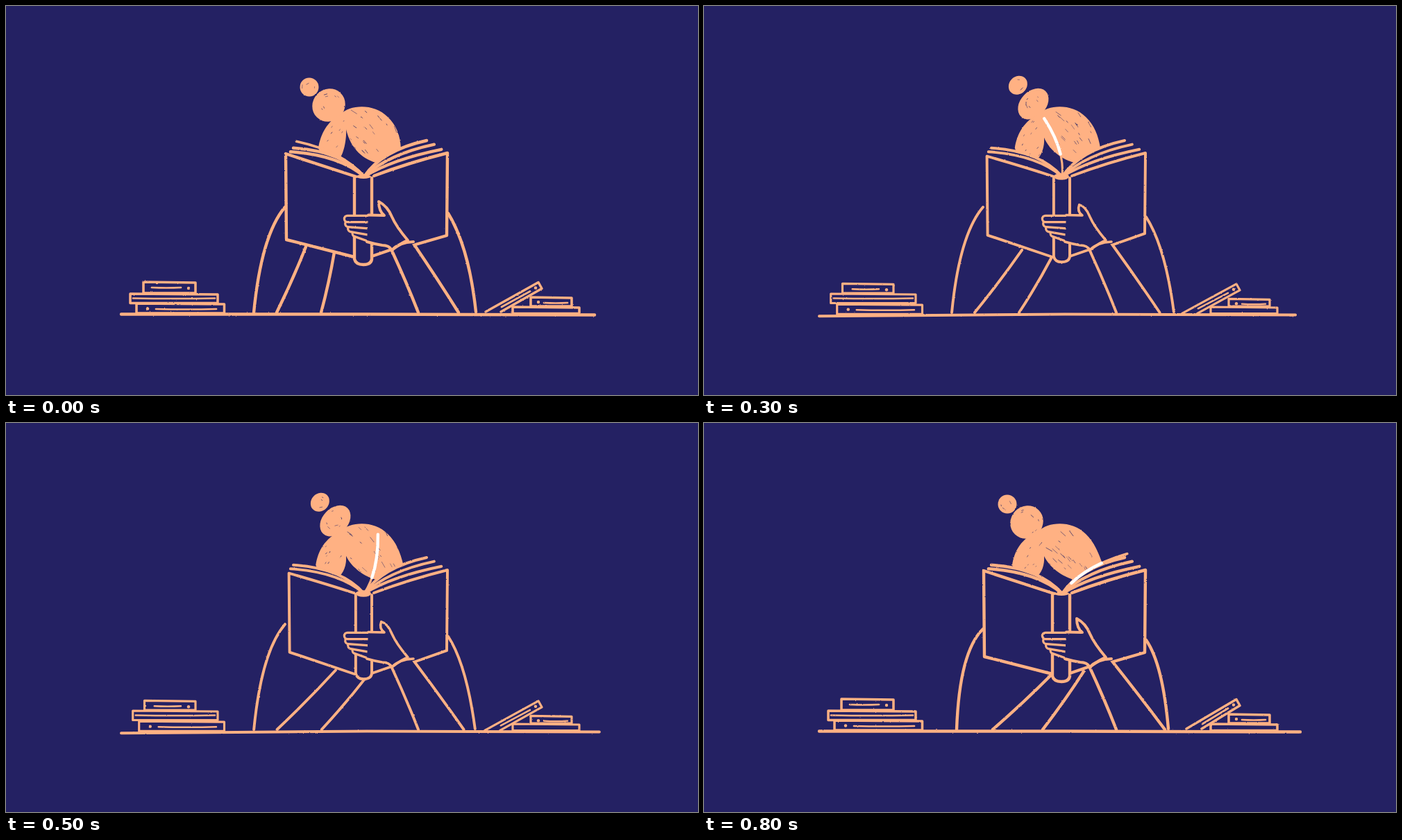
An HTML page for the animation above (1 s loop, 997 by 561 pixels).

```html
<!DOCTYPE html>
<html lang="en">
<head>
<meta charset="utf-8">
<title>Reader</title>
<style>
  html, body { margin: 0; width: 100%; height: 100%; overflow: hidden; background: #242163; }
  svg { display: block; width: 997px; height: 561px; }
  .pose { visibility: hidden; animation: show 1s step-end infinite; }
  .pose:last-child { animation-name: hold; }
  @keyframes show { 0% { visibility: visible; } 10% { visibility: hidden; } }
  @keyframes hold { 0% { visibility: visible; } 20% { visibility: hidden; } }
</style>
</head>
<body>
<svg id="stage" viewBox="0 0 997 561" fill="none" stroke-linecap="round" stroke-linejoin="round"></svg>
<script>
const BG = '#242163', INK = '#ffb183', WHITE = '#fff';
const POSES = 9;
const HUB = [516, 246]; // fold of the book

const lerp = (a, b, t) => a + (b - a) * t;

function random(seed) {
  return () => (seed = (seed * 16807) % 2147483647) / 2147483647;
}

// A page standing at an angle from upright, bowed sideways
function leaf(degrees, length, bow) {
  const a = degrees * Math.PI / 180, sin = Math.sin(a), cos = Math.cos(a);
  const tip = [HUB[0] + sin * length, HUB[1] - cos * length];
  const bend = [HUB[0] + sin * length * .4 + cos * bow * 2, HUB[1] - cos * length * .4 + sin * bow * 2];
  return { tip, bend, d: `M${HUB}Q${bend} ${tip}` };
}

function drawPose(i) {
  const t = i / (POSES - 1);
  const sway = Math.sin(Math.PI * t); // out and back over the loop
  const late = t ** 8;                // shift that comes at the very end
  const rnd = random(977 + i * 5413);
  const pen = 4.4 - .5 * sway, thin = pen * .8, fine = pen * .62;
  let out = '';

  const stroke = (d, w = pen, color = INK, extra = '') => {
    out += `<path d="${d}" stroke="${color}" stroke-width="${w}" ${extra}/>`;
  };
  const fill = (d, color = BG) => { out += `<path d="${d}" fill="${color}"/>`; };
  const dot = (x, y) => { out += `<circle cx="${x}" cy="${y}" r="2.2" fill="${INK}"/>`; };
  const box = (x, y, x2, y2) => stroke(`M${x} ${y}L${x2} ${y + 1}V${y2}H${x}Z`, thin);
  const label = (x, x2, y) => stroke(`M${x} ${y}Q${(x + x2) / 2} ${y + 1} ${x2} ${y}`, fine);

  function fleck(x, y, angle, len) {
    const dx = Math.cos(angle) * len / 2, dy = Math.sin(angle) * len / 2;
    stroke(`M${x - dx} ${y - dy}L${x + dx} ${y + dy}`, .5 + rnd() * .5, BG, 'opacity=".75"');
  }

  function ball(x, y, rx, ry, flecks) {
    out += `<ellipse cx="${x}" cy="${y}" rx="${rx}" ry="${ry}" transform="rotate(-46 ${x} ${y})" fill="${INK}"/>`;
    for (let k = 0; k < flecks; k++) {
      const a = rnd() * 6.28, r = ry * (.3 + rnd() * .5);
      fleck(x + Math.cos(a) * r, y + Math.sin(a) * r, a + 1.57, 1 + rnd() * 4);
    }
  }

  function drawHair() {
    const lean = sway ** 2;
    ball(437 + 18 * lean, 117 - 3 * sway, 13.5 + sway, 13.5 - sway, 3);
    ball(465 + 11 * lean, 143 - 2 * sway, 24.5 + sway, 23 - 5 * sway, 6);

    const left = 450 - 6 * t, right = 569 + 6 * t;
    const part = 192 - 14 * (1 - t) ** 4;
    const d = `M${left} 205C${left + 3} 185 ${left + 13} 166 482 156C496 142 530 140 550 160` +
      `C562 172 568 185 ${right} 206L537 227C515 222 497 207 490 ${part}` +
      `C491 ${part + 12} 487 217 477 224L${left + 8} 222Z`;
    fill(d, INK);
    out += `<clipPath id="hair${i}"><path d="${d}"/></clipPath><g clip-path="url(#hair${i})">`;
    for (let k = 0; k < 24; k++) {
      const x = 495 + rnd() * 72;
      fleck(x, 152 + rnd() * 62, .45 + (x - 495) / 110 + rnd() * .25, 2 + rnd() * 8);
    }
    for (let k = 0; k < 10; k++) fleck(452 + rnd() * 36, 165 + rnd() * 50, 2 + rnd() * .4, 1 + rnd() * 2);
    out += '</g>';
  }

  const bookBottom = x => 366 - .28 * Math.abs(x - 516);

  function drawArms() {
    stroke(`M402 ${290 + 7 * late}Q368 330 ${357 + 7 * late} 442`);
    stroke(`M637 ${lerp(299, 313, t)}Q${667 - 6 * t} 348 ${677 - 8 * t ** 4} 441`);

    const forearm = (x, y, foot) => stroke(`M${x} ${y}Q${(x + foot) / 2 + 2} ${(y + 442) / 2 + 1} ${foot} 442`);
    const inner = lerp(433, 500, t), outer = lerp(473, 547, t);
    forearm(inner, bookBottom(inner) + 2, 390 + 26 * late);
    forearm(outer, bookBottom(outer) + 1, 454 + 34 * late);
    forearm(556, 353, 594);
    forearm(586, 341, 652 + 12 * t);
  }

  function drawBook() {
    const x = 403 + 5 * sway, y = 213 + 4 * sway, low = 337 - 7 * sway;
    const left = [], right = [];
    for (let k = 0; k < 3; k++) {
      if (k < 2) left.push(leaf(-68 - 3.4 * k, 110 + 2 * k, 11 - 2 * k));
      right.push(leaf(60 + 5.3 * k, 104 + 7 * k, 2.5 * k - 10));
    }
    fill(`M${left[0].tip}Q${left[0].bend} ${HUB}Q${right[0].bend} ${right[0].tip}` +
      `L636 212V330L515 362L${x} ${low}V${y}Z`);
    for (const p of [...left, ...right]) stroke(p.d);

    // covers
    stroke(`M504 246Q458 231 ${x} ${y}L${x + 1} ${low}L502 362`);
    stroke(`M530 245Q580 226 636 212L635 ${331 - 3 * sway}L590 344`);
    stroke('M556 351L527 361');

    // spine
    const sx = 502 + 2 * sway, sy = 373 - 4 * sway;
    const back = `M${sx} 248V${sy - 8}Q${sx + 2} ${sy} 515 ${sy}Q526 ${sy} 527 ${sy - 8}V248`;
    fill(back);
    stroke(back);
    out += `<ellipse cx="515" cy="246" rx="11" ry="${3 + 2 * sway}" fill="${INK}"/>`;

    // turning page, lit above its foot
    const turn = leaf(lerp(-62.5, 58.5, t), 86 + 24 * (2 * t - 1) ** 2, 9 - 4 * t - 14 * t ** 12);
    const foot = lerp(.48, .18, t), lit = 1 - foot - .35 * t ** 16;
    stroke(turn.d, thin);
    if (t) stroke(turn.d, 4.4, WHITE, `pathLength="1" stroke-dasharray="${lit} 2" stroke-dashoffset="${-foot}"`);
  }

  function drawHand() {
    for (let k = 3; k >= 0; k--) {
      const finger = `M${492 + 1.3 * k * k} ${307 + 7 * k}L523 ${307 + 9.3 * k}`;
      stroke(finger, 12.5);
      stroke(finger, 6, BG);
    }
    const tx = 537 + 4 * sway, ty = 282 + 5 * sway;
    const thumb = `M522 301.5L545 302Q537 296 ${tx} ${ty}Q550 289 556 304Q562 318 579 338`;
    const palm = 'Q572 340 556 352Q552 345 542 345Q530 343 520 340';
    fill(thumb + palm);
    stroke(thumb + palm, pen * .9);
    stroke('M556 352Q566 341 587 340', pen * .9);
  }

  function drawStacks() {
    const dx = 4 * sway, dy = 2.5 * sway;
    box(198 + dx * .4, 398 + dy, 273, 414);
    label(210 + dx, 252, 406 + dy);
    dot(263, 407 + dy);
    box(179 + dx, 415, 305, 428.5);
    label(183 + dx, 301, 421.5);
    box(188 + dx, 429 + dy * .5, 314.5, 443 + dy * .6);
    dot(204 + dx, 436.5 + dy * .5);
    label(216 + dx, 303, 437 + dy * .5);

    const x = 691 - dx + 4 * t, y = 441 + dy, top = 398.5 + dy;
    stroke(`M${x} ${y}L767 ${top}L772 ${top + 9}L${x + 22} ${y}`, thin);
    stroke(`M${x + 23} ${y - 7}L755 ${top + 13}`, fine);
    dot(763, top + 8);
    box(756, 420 + dy, 815, 433);
    dot(767, 427 + dy);
    label(775, 809, 428 + dy * .7);
    box(730, 434, 826, 443.5);
  }

  drawHair();
  drawArms();
  drawBook();
  drawHand();
  drawStacks();
  const floor = 444.5 + 3 * sway;
  stroke(`M166 ${floor}C300 ${floor} 380 444.5 520 444.5L${848 + 11 * t} 445.5`);

  // A new noise seed per pose makes the chalk edge boil
  return `<g class="pose" style="animation-delay:${i * 100 - 1000}ms">` +
    `<filter id="chalk${i}" filterUnits="userSpaceOnUse" x="0" y="0" width="997" height="561" color-interpolation-filters="sRGB">` +
    `<feTurbulence type="fractalNoise" baseFrequency=".3" numOctaves="2" seed="${i + 3}"/>` +
    `<feDisplacementMap in="SourceGraphic" scale="1.8" xChannelSelector="R" yChannelSelector="G"/></filter>` +
    `<g filter="url(#chalk${i})">${out}</g></g>`;
}

document.getElementById('stage').innerHTML =
  Array.from({ length: POSES }, (_, i) => drawPose(i)).join('');
</script>
</body>
</html>
```
